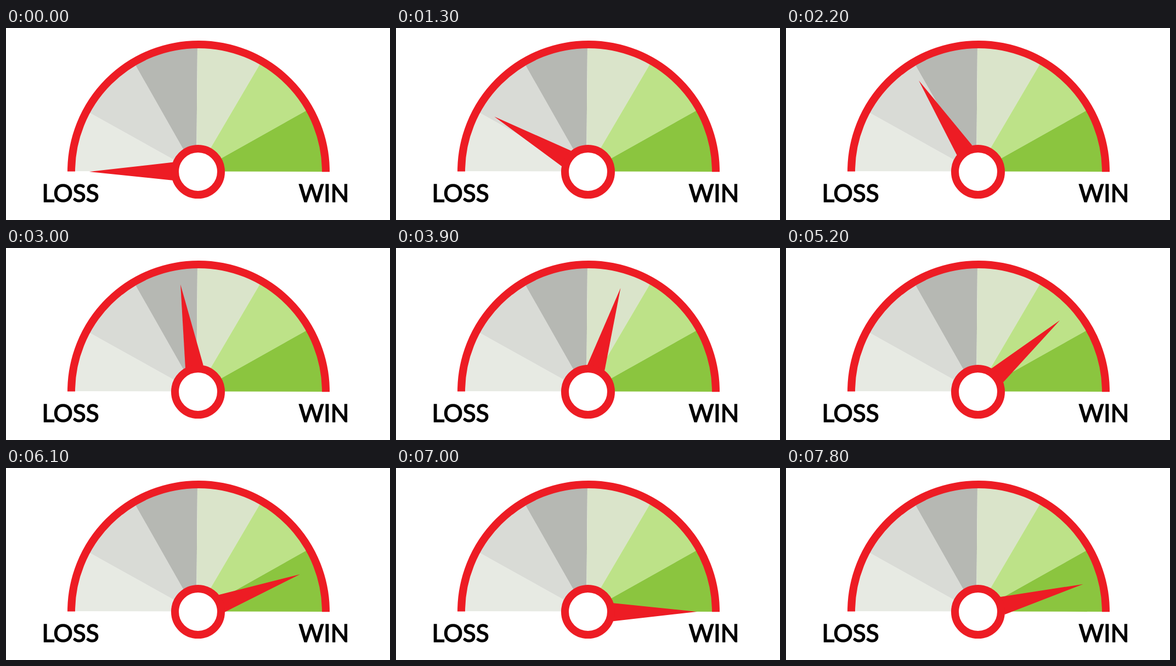
An HTML page that plays this animation: 700 by 350 pixels, repeating every 7900 ms.

```html
<!DOCTYPE html>
<html lang="en">
<head>
<meta charset="utf-8">
<title>Loss to win gauge</title>
<style>
  html, body { margin: 0; width: 100%; height: 100%; overflow: hidden; background: #fff; }
  svg { display: block; width: 700px; height: 350px; }
  text {
    font: 400 44px Lato, "Open Sans", sans-serif;
    text-anchor: middle;
    stroke: #000;
    stroke-width: 1.6px;
  }
</style>
</head>
<body>
<svg viewBox="0 0 700 350">
  <clipPath id="dial"><path d="M112 0H590V262L112 261Z"/></clipPath>
  <g id="sectors" clip-path="url(#dial)"></g>
  <path d="M119 261.5A232 232 0 0 1 583 262.3" fill="none" stroke="#ed1c24" stroke-width="14"/>
  <path id="needle" d="M151.8 262L304 244.7V277.8Z" fill="#ed1c24"/>
  <circle cx="350" cy="262" r="42" fill="#fff" stroke="#ed1c24" stroke-width="14"/>
  <text x="117.5" y="317">LOSS</text>
  <text x="579.5" y="317">WIN</text>
</svg>
<script>
  const LOOP = 7900, STEP = 100;

  // Sector colours, each with the rim angle where it ends.
  const sectors = {
    "#e7eae3": 151.6, "#d9dbd6": 120.6, "#b6b8b3": 90.5,
    "#dae4ca": 60.3, "#bde288": 29.6, "#8bc53f": -1
  };

  function rimPoint(deg) {
    const a = deg * Math.PI / 180;
    return [351 + 230 * Math.cos(a), 262 - 230 * Math.sin(a)];
  }

  let from = 181;
  let paths = "";
  for (const [fill, to] of Object.entries(sectors)) {
    paths += `<path fill="${fill}" d="M347 263L${rimPoint(from)}A230 230 0 0 1 ${rimPoint(to)}Z"/>`;
    from = to;
  }
  document.getElementById("sectors").innerHTML = paths;

  // Degrees clockwise from pointing left: speed up, cruise, slow down, swing back.
  function angleAt(t) {
    if (t < 1600) return 39.2 * (t / 1600) ** 1.21;
    if (t < 4000) return 39.2 + 71.2 * (t - 1600) / 2400;
    if (t < 7000) return 180 - 69.6 * ((7000 - t) / 3000) ** 1.03;
    return 180 - 0.021 * Math.max(0, t - 7100);
  }

  const needle = document.getElementById("needle");
  const start = performance.now();

  function draw() {
    const t = (performance.now() - start) % LOOP;
    const angle = angleAt(Math.floor(t / STEP) * STEP);
    needle.setAttribute("transform", `rotate(${angle} 350 262)`);
    requestAnimationFrame(draw);
  }
  draw();
</script>
</body>
</html>
```
